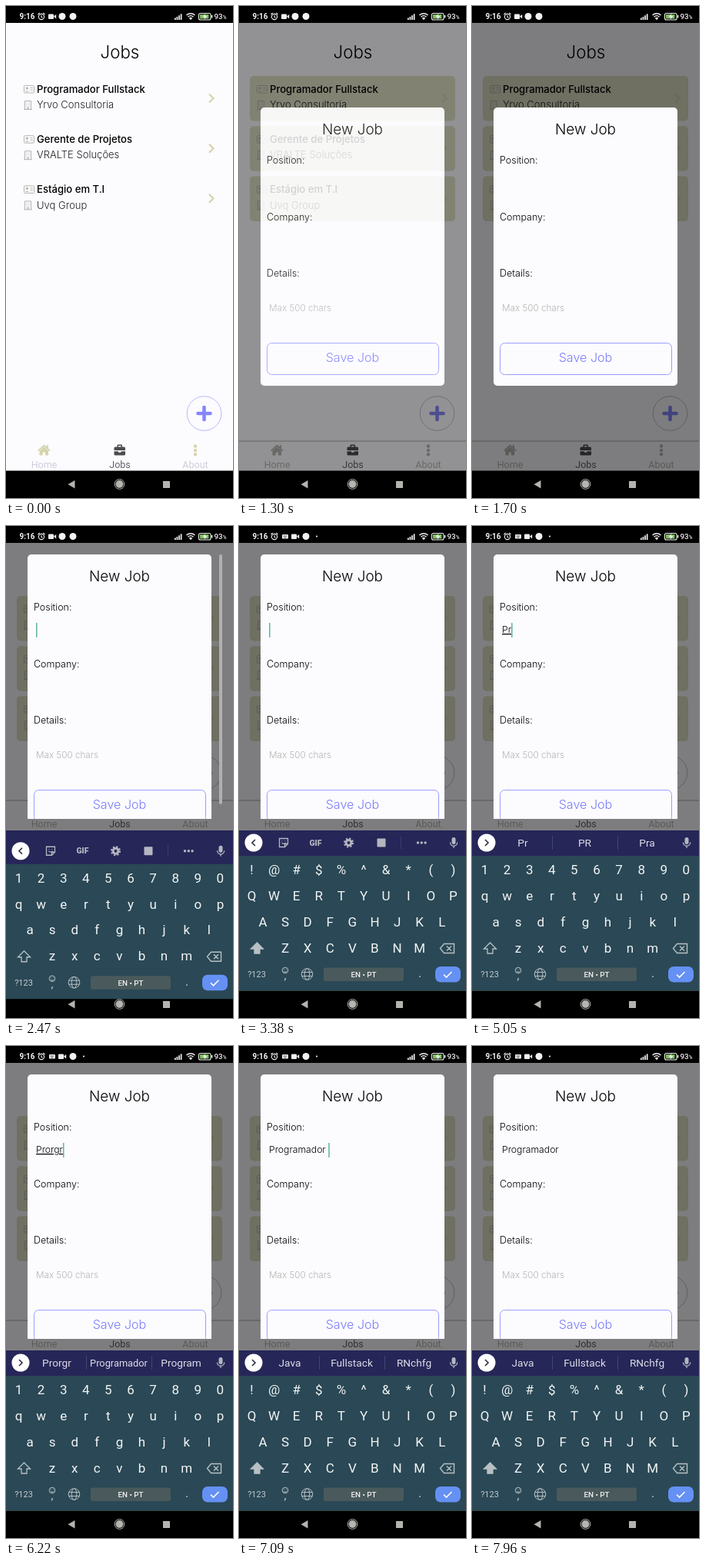
An HTML page for the animation above (7990 ms loop, 295 px wide and 640 px high).

```html
<!DOCTYPE html>
<html lang="pt">
<head>
<meta charset="utf-8">
<title>Jobs</title>
<style>
html, body { margin: 0; width: 100%; height: 100%; overflow: hidden; background: #000; }
#stage { display: block; width: 100%; height: 100%; }
text { font-family: Inter, sans-serif; white-space: pre; }
.ui text, text.ui { font-family: Roboto, sans-serif; }
.mid { text-anchor: middle; }
.line { fill: none; stroke: currentColor; }
.soft { color: #d6d4ac; }
.label { color: #cdcddd; }
.ring { stroke: #a8a8fa; }
.dimOnly { visibility: hidden; }
.dim .tab { color: #b4b4b0; }
.dim .ring { stroke: #b0b0b8; }
.dim .dimOnly { visibility: visible; }
</style>
</head>
<body>
<svg id="stage" viewBox="0 0 295 640">
  <defs>
    <g id="badge" class="line">
      <rect x=".5" y=".5" width="13" height="9.5" rx="1"/>
      <circle cx="4.3" cy="4" r="1.2" fill="currentColor"/>
      <path d="M2.2 8h4.2M8.3 3.5h3.5M8.3 6.2h3.5"/>
    </g>
    <g id="building" class="line">
      <path d="M0 11.5h11M1.5 11.5V.5h8v11M4.5 11.5V9h2v2.5"/>
      <path stroke-dasharray="1.3 1.2" d="M4 2.2v6M7 2.2v6"/>
    </g>
    <g id="camera"><rect x="-5" y="-3" width="7" height="6.4" rx="1"/><path d="M2 0l3.2-2.6v5.6z"/></g>
  </defs>

  <rect y="21" width="295" height="584" fill="#fcfcff"/>
  <text class="mid" x="148" y="68" font-size="22.3" font-weight="300">Jobs</text>
  <g id="rows"></g>

  <g id="bottom">
    <circle class="ring" cx="257.5" cy="530" r="22.3" fill="#fcfcff" stroke-width=".8"/>
    <path d="M257.5 522v16M249.5 530h16" stroke="#8585fb" stroke-width="4.6" stroke-linecap="round"/>
    <path class="dimOnly" d="M0 566h295" stroke="#aaa"/>
    <g class="soft tab" fill="currentColor">
      <path d="M41 578l8.3-7.5 3.5 3.1v-2.4h2.2v4.4l2.8 2.4-1.2 1.3-7.3-6.4-7.2 6.4z"/>
      <path d="M43.5 578.5l5.8-5 5.8 5v6h-4.2v-4h-3.2v4h-4.2z"/>
      <circle cx="246" cy="572.5" r="2.2"/><circle cx="246" cy="577.9" r="2.2"/><circle cx="246" cy="583.3" r="2.2"/>
    </g>
    <path fill="#4c4c50" d="M140.500 575q0-1.500 1.500-1.500h2.500v-2q0-1 1-1h4.500q1 0 1 1v2h2.500q1.500 0 1.500 1.500v3h-14.500zM146 573.500h3.500v-1.500h-3.500zM140.500 579.300h5.500v1.500h3.500v-1.500h5.500v4q0 1.300-1.500 1.300h-11.500q-1.500 0-1.500-1.300z"/>
    <g class="ui mid" font-size="12.5">
      <text class="label tab" fill="currentColor" x="49.5" y="601">Home</text>
      <text fill="#606068" x="148" y="601">Jobs</text>
      <text class="label tab" fill="currentColor" x="246" y="601">About</text>
    </g>
  </g>

  <g id="dialog">
    <rect y="21" width="295" height="584" opacity=".5"/>
    <rect id="scrollbar" x="277" y="37" width="4" height="325" rx="2" fill="#b0b0b2"/>
    <svg id="modal" x="28" width="239">
      <rect width="239" height="362" rx="5" fill="#fcfcff"/>
      <text class="mid" x="119.5" y="34.5" font-size="18.9" font-weight="300">New Job</text>
      <g font-size="12.5" font-weight="300">
        <text x="8" y="73.3">Position:</text>
        <text x="8" y="146.5">Company:</text>
        <text x="8" y="219.5">Details:</text>
      </g>
      <text x="11" y="265" font-size="11.7" font-weight="300" fill="#b4b4b2">Max 500 chars</text>
      <rect x="8.5" y="306.5" width="223" height="41" rx="6" fill="none" stroke="#9c9cfc"/>
      <text class="mid" x="119.5" y="331" font-size="16.1" font-weight="300" fill="#7c7cfa">Save Job</text>
      <text id="typed" x="11" y="102" font-size="12.2" font-weight="300"></text>
      <rect id="cursor" y="89" width="1.6" height="19" fill="#68b8a0"/>
    </svg>
  </g>

  <rect width="295" height="22"/>
  <g fill="#f2f2f2">
    <text class="ui" x="17.5" y="17.2" font-size="10" font-weight="700">9:16</text>
    <g fill="none" stroke="#f2f2f2" stroke-width="1.1">
      <circle cx="46" cy="14" r="3.6"/><path d="M46 12v2.3l1.5 1M41.5 11l2.2-2M50.5 11l-2.2-2"/>
      <path d="M234.5 12a8 8 0 0 1 11 0M236.5 14.2a5 5 0 0 1 7 0" stroke-width="1.4"/>
      <rect x="250.5" y="9.5" width="15.5" height="8.5" rx="2"/>
    </g>
    <g id="idleIcons"><use href="#camera" x="60" y="13.5"/><circle cx="73" cy="13.5" r="4.5"/><circle cx="87" cy="13.5" r="4.5"/></g>
    <g id="typingIcons">
      <rect x="56" y="11" width="8" height="5.5" rx="1"/><path d="M57.5 13h5M58.5 15h3" stroke="#000" stroke-dasharray="1 .6"/>
      <use href="#camera" x="73" y="13.5"/><circle cx="87" cy="13.5" r="4.5"/><circle cx="101" cy="13.5" r="1.1"/>
    </g>
    <path d="M219 15.5h1.7v2.5h-1.7zM221.6 14h1.7v4h-1.7zM224.2 12.2h1.7v5.8h-1.7zM226.8 10.3h1.7v7.7h-1.7z"/>
    <path d="M237.8 15.7a3.4 3.4 0 0 1 4.4 0l-2.2 2.5zM266.8 12h1.5v3.5h-1.5z"/>
    <rect x="252" y="11" width="11.5" height="5.5" fill="#7fc060"/>
    <path d="M259.5 9.5l-4 5h3l-1 3.5 4-5h-3z"/>
    <text class="ui" x="270.5" y="17" font-size="9.8" font-weight="500">93<tspan font-size="6.5">%</tspan></text>
  </g>

  <!-- The keyboard rises over the navigation bar, below its buttons -->
  <rect y="604.5" width="295" height="36"/>
  <svg id="keyboard" y="396" width="295" height="244" viewBox="0 396 295 244">
    <g id="keys" class="ui">
      <rect y="384" width="295" height="46" fill="#262658"/>
      <rect y="429" width="295" height="175.5" fill="#2a4855"/>
      <circle cx="19" cy="412" r="11.5" fill="#fff"/>
      <path id="arrow" d="M-2 -4l4 4-4 4" fill="none" stroke="#334" stroke-width="1.7"/>
      <rect x="276.5" y="405" width="5" height="9" rx="2.5" fill="#b4b6c0"/>
      <path fill="none" stroke="#b4b6c0" stroke-width="1.3" d="M274.5 411.5a4.6 4.6 0 0 0 9.2 0M279 416v3"/>
      <g id="tools" fill="#b4b6c0">
        <g fill="none" stroke="#b4b6c0" stroke-width="1.3">
          <path d="M52.5 406.5h11v7l-4 4h-7zM63.5 413.5h-4v4M55.5 412a3 3 0 0 0 5 0M56 409.5v.8M60 409.5v.8"/>
          <circle cx="142.5" cy="412" r="3.4" stroke-width="3"/>
          <circle cx="142.5" cy="412" r="5.6" stroke-width="2" stroke-dasharray="2.2 2.2"/>
        </g>
        <text class="mid" x="99.5" y="415.5" font-size="10.5" font-weight="800">GIF</text>
        <rect x="179.5" y="406.5" width="11" height="11" rx="1"/>
        <circle cx="232.5" cy="412" r="1.7"/><circle cx="237.3" cy="412" r="1.7"/><circle cx="242.1" cy="412" r="1.7"/>
        <path d="M210.5 404v16" stroke="#3c3c68"/>
      </g>
      <g id="words" class="mid" fill="#dcdce8">
        <path d="M104.5 403v18M189.5 403v18" stroke="#3c4a70"/>
        <text x="66" y="417"></text><text x="146.5" y="417"></text><text x="227.5" y="417"></text>
      </g>
      <g id="letters" class="mid" font-size="17" fill="#f2f4f6"></g>
      <path id="shift" d="M23.5 542l8 8h-4.5v6h-7v-6h-4.5z" stroke="#b8c0c4" stroke-width="1.3"/>
      <path d="M261.5 549.5l5-6h13v12h-13zM270 546.5l6 6M276 546.5l-6 6" fill="none" stroke="#b8c0c4" stroke-width="1.4"/>
      <g class="mid" fill="#c4ccd0">
        <text x="23" y="587" font-size="11">?123</text>
        <text x="60" y="590" font-size="15">,</text>
        <text x="235" y="587" font-size="16">.</text>
      </g>
      <g fill="none" stroke="#b8c0c4">
        <circle cx="60" cy="578" r="3.8"/><path d="M58 579a2.2 2.2 0 0 0 4 0M58.5 576.3v.8M61.5 576.3v.8"/>
        <circle cx="88.5" cy="583" r="7.3"/><ellipse cx="88.5" cy="583" rx="3.3" ry="7.3"/><path d="M82 580.5h13M82 585.5h13"/>
      </g>
      <rect x="110" y="574.5" width="104" height="17.5" rx="3" fill="#4a5a5c"/>
      <text class="mid" x="162" y="587" font-size="9.8" font-weight="500" fill="#f0f0f0">EN • PT</text>
      <rect x="255" y="573" width="33" height="20.5" rx="7" fill="#6590f4"/>
      <path d="M266 583.5l3.5 3.5 7-7" fill="none" stroke="#fff" stroke-width="1.6"/>
    </g>
  </svg>
  <g fill="#b4b4b0">
    <path d="M80.5 622.3l9-5.3v10.6z"/>
    <circle cx="147.5" cy="622" r="5"/><circle cx="147.5" cy="622" r="6.4" fill="none" stroke="#b4b4b0"/>
    <rect x="204" y="618" width="9" height="9"/>
  </g>
</svg>
<script>
const $ = id => document.getElementById(id);
const set = (node, attrs) => { for (const k in attrs) node.setAttribute(k, attrs[k]); };
const show = (node, on) => { node.style.display = on ? '' : 'none'; };
const clamp = v => Math.max(0, Math.min(1, v));

const LOOP = 7990, OPEN = 1050, FOCUS = 2220, RESIZE = 2300, SHIFT_ON = 2600;
const FIRST_KEY = 4300, ACCEPT = 7000;

const jobs = [
  ['Programador Fullstack', 'Yrvo Consultoria'],
  ['Gerente de Projetos', 'VRALTE Soluções'],
  ['Estágio em T.I', 'Uvq Group']
];
// Start time, field content, keyboard suggestions
const typing = [
  [0, '', []],
  [FIRST_KEY, 'P', ['P', 'Para', 'Por']],
  [4700, 'Pr', ['Pr', 'PR', 'Pra']],
  [5300, 'Pro', ['Pro', 'Programador', 'Program']],
  [5600, 'Pror', ['Pror', 'Por', 'Prior']],
  [5850, 'Prorg', ['Prorg', 'Programador', 'Program']],
  [6100, 'Prorgr', ['Prorgr', 'Programador', 'Program']],
  [ACCEPT, 'Programador ', ['Java', 'Fullstack', 'RNchfg']]
];

$('rows').innerHTML = jobs.map(([position, company], i) => `
  <g transform="translate(0 ${i * 65.2})">
    <rect class="dimOnly" x="14" y="91" width="267" height="58.5" rx="5" fill="#e0e0c6"/>
    <use href="#badge" x="23" y="103" color="#b6b6b0"/>
    <text x="40" y="112.5" font-size="13.1" font-weight="500">${position}</text>
    <use href="#building" x="23" y="123" color="#b2b2b4"/>
    <text x="40" y="133.3" font-size="13" font-weight="300" fill="#222">${company}</text>
    <path class="line soft" stroke-width="2.2" d="M264 114.5l5.5 5.5-5.5 5.5"/>
  </g>`).join('');

const keyRows = [
  ['1234567890', '!@#$%^&*()', 16.5, 453],
  ['qwertyuiop', 'QWERTYUIOP', 16.5, 487],
  ['asdfghjkl', 'ASDFGHJKL', 31, 520.5],
  ['zxcvbnm', 'ZXCVBNM', 60, 554.5]
];
const keyNodes = [];
for (const [lower, upper, x, y] of keyRows) {
  [...lower].forEach((char, i) => {
    const node = document.createElementNS('http://www.w3.org/2000/svg', 'text');
    set(node, { x: x + i * 29.1, y });
    $('letters').append(node);
    keyNodes.push({ node, lower: char, upper: upper[i] });
  });
}

function draw(t) {
  const open = t >= OPEN, resized = t >= RESIZE;
  $('stage').classList.toggle('dim', open);
  show($('dialog'), open);
  $('dialog').setAttribute('opacity', clamp((t - OPEN) / 300));
  set($('modal'), resized ? { y: 37, height: 344 } : { y: 132, height: 362 });
  $('bottom').setAttribute('transform', `translate(0 ${resized ? -209 : 0})`);
  $('scrollbar').setAttribute('opacity', resized ? 1 - clamp((t - 2700) / 250) : 0);

  const [since, content, suggestions] = typing.findLast(step => step[0] <= t);
  const composing = content && t < ACCEPT;
  $('typed').textContent = content;
  $('typed').setAttribute('text-decoration', composing ? 'underline' : 'none');
  const blinkStart = since || FOCUS;
  show($('cursor'), t >= FOCUS && (t - blinkStart) % 1000 < 500);
  $('cursor').setAttribute('x', 11 + (content ? $('typed').getComputedTextLength() : 0));

  show($('keyboard'), t >= FOCUS);
  const drop = 208 * (1 - clamp((t - FOCUS) / 400)) ** 3;
  $('keys').setAttribute('transform', `translate(0 ${drop})`);
  const shifted = t >= SHIFT_ON && !composing;
  for (const key of keyNodes) key.node.textContent = shifted ? key.upper : key.lower;
  $('shift').setAttribute('fill', shifted ? '#b8c0c4' : 'none');
  $('arrow').setAttribute('transform', `translate(19 412) scale(${content ? 1 : -1} 1)`);
  show($('tools'), !content);
  show($('words'), content);
  $('words').querySelectorAll('text').forEach((node, i) => {
    const word = suggestions[i] || '';
    node.textContent = word;
    node.setAttribute('font-size', word.length > 9 ? 12.8 : 13.7);
  });

  show($('idleIcons'), t < SHIFT_ON);
  show($('typingIcons'), t >= SHIFT_ON);
}

const start = performance.now();
function tick() {
  draw((performance.now() - start) % LOOP);
  requestAnimationFrame(tick);
}
tick();
</script>
</body>
</html>
```
